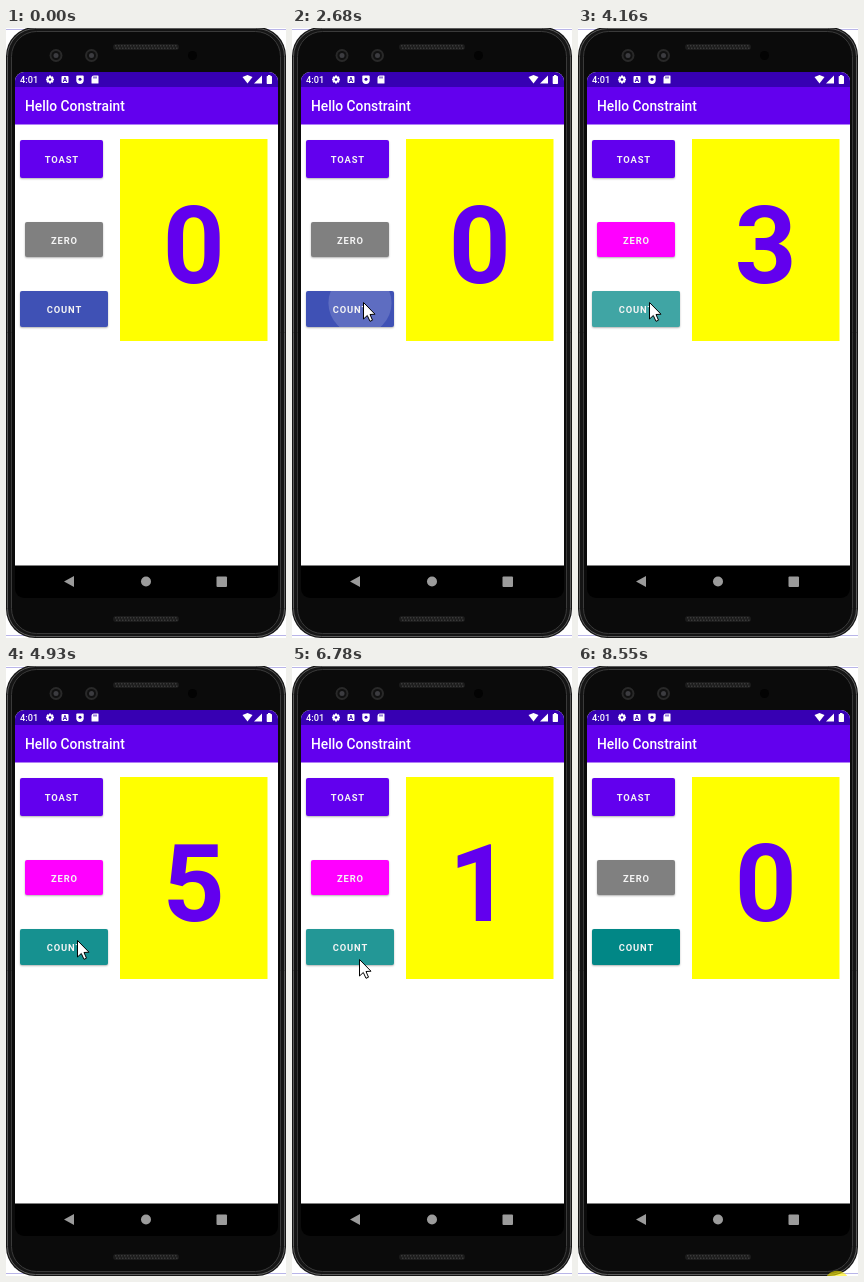
An HTML page with a canvas that plays this animation: 280x610 px, repeating every 8.78 s.

```html
<!DOCTYPE html>
<html lang="en">
<head>
<meta charset="utf-8">
<title>Hello Constraint</title>
<style>
html, body { margin: 0; width: 100%; height: 100%; overflow: hidden; background: #fff; }
canvas { display: block; width: 280px; height: 610px; }
</style>
</head>
<body>
<canvas id="stage" width="280" height="610"></canvas>
<script>
const ctx = document.getElementById('stage').getContext('2d');
const LOOP = 8780;
const ENTER = 360;
const HALO = 90, PRESS = 150, HOLD = 80, FADE = 150;

const buttons = {
  toast: { label: 'TOAST', x: 14, y: 112, w: 83, h: 38 },
  zero: { label: 'ZERO', x: 19, y: 194, w: 78, h: 35 },
  count: { label: 'COUNT', x: 14, y: 263, w: 88, h: 36 }
};

// The app answers the first click late
const click = (at, on, lag = 0) => ({ at, on, start: at + lag, hit: at + lag + PRESS });
const clicks = [
  click(2210, 'count', 470),
  ...[3385, 3930, 4240, 4600].map(at => click(at, 'count')),
  click(5470, 'zero'),
  click(6480, 'count'),
  click(7400, 'zero'),
  click(8550)
];

const home = { x: 235, y: 604 };
const moves = [
  { from: ENTER, to: 1210, x: 75, y: 228 },
  { from: 1590, to: 1980, x: 71, y: 274 },
  { from: 4930, to: 5320, x: 67, y: 221 },
  { from: 6003, to: 6310, x: 67, y: 293 },
  { from: 6870, to: 7320, x: 67, y: 221 },
  { from: 7630, to: 8250, x: 259, y: 617 }
];

const clamp = v => Math.min(1, Math.max(0, v));
const ease = v => v * v * (3 - 2 * v);

function pointerAt(t) {
  let { x, y } = home;
  for (const m of moves) {
    const k = ease(clamp((t - m.from) / (m.to - m.from)));
    x += (m.x - x) * k;
    y += (m.y - y) * k;
  }
  return { x, y };
}

function stateAt(t) {
  let count = 0, odd = false;
  for (const c of clicks.filter(c => c.on && c.hit <= t)) {
    if (c.on === 'zero') count = 0;
    else odd = ++count % 2 === 1;
  }
  return { count, odd };
}

function rect(x, y, w, h, color) {
  ctx.fillStyle = color;
  ctx.fillRect(x, y, w, h);
}

function round(x, y, w, h, r, fill, line) {
  ctx.beginPath();
  ctx.roundRect(x, y, w, h, r);
  if (fill) { ctx.fillStyle = fill; ctx.fill(); }
  if (line) { ctx.strokeStyle = line; ctx.stroke(); }
}

function clipRound(x, y, w, h, r) {
  ctx.beginPath();
  ctx.roundRect(x, y, w, h, r);
  ctx.clip();
}

function disc(x, y, r, color) {
  ctx.fillStyle = color;
  ctx.beginPath();
  ctx.arc(x, y, r, 0, Math.PI * 2);
  ctx.fill();
}

function poly(points, fill, line) {
  ctx.beginPath();
  points.forEach(([x, y]) => ctx.lineTo(x, y));
  ctx.closePath();
  ctx.fillStyle = fill;
  ctx.fill();
  if (line) { ctx.strokeStyle = line; ctx.stroke(); }
}

function text(s, x, y, size, weight, color, align = 'left', spacing = 0) {
  ctx.font = `${weight} ${size}px Roboto, sans-serif`;
  ctx.letterSpacing = spacing + 'px';
  ctx.textAlign = align;
  ctx.fillStyle = color;
  ctx.fillText(s, x + (align === 'center' ? spacing / 2 : 0), y);
}

function grille(y) {
  round(107, y, 66, 6, 3, '#1b1b1b');
  for (let x = 109; x < 172; x += 3) {
    rect(x, y + 1, 1.5, 1.5, '#3a3a3a');
    rect(x + 1, y + 3.5, 1.5, 1.5, '#3a3a3a');
  }
}

function lens(x) {
  disc(x, 27.5, 6.5, '#292929');
  disc(x, 27.5, 4.5, '#111');
  disc(x, 27.5, 2.5, '#3c3c40');
}

function phone() {
  rect(0, 0, 280, 610, '#fff');
  rect(0, 1, 280, 1, '#b9b5e8');
  rect(0, 607, 280, 1, '#b9b5e8');
  round(0, -1, 280, 611, 29, '#151515');
  round(1.5, 0.5, 277, 608, 28, null, '#5c5c5c');
  round(5.5, 3.5, 269, 602, 25, '#0b0b0b', '#3a3a3a');
  grille(16);
  grille(588);
  lens(50);
  lens(85.5);
  disc(186.5, 27.5, 4.5, '#030303');
}

function gear(x, y) {
  for (let i = 0; i < 4; i++) {
    ctx.save();
    ctx.translate(x, y);
    ctx.rotate(i * Math.PI / 4);
    rect(-4, -1, 8, 2, '#fff');
    ctx.restore();
  }
  disc(x, y, 3, '#fff');
  disc(x, y, 1.3, '#3700b3');
}

function statusBar() {
  rect(9, 44, 263, 15, '#3700b3');
  text('4:01', 14, 55, 9.2, 500, '#fff');
  gear(44, 51.5);
  round(55.5, 48, 7, 7, 1, '#fff');
  text('A', 59, 54, 6.5, 700, '#3700b3', 'center');
  round(70.3, 47.5, 7.4, 8.5, [1, 1, 4, 4], '#fff');
  disc(74, 51.3, 1.5, '#3700b3');
  round(85.5, 47.5, 7, 8, [2.5, 0.5, 0.5, 0.5], '#fff');
  rect(87.5, 48.5, 1, 2, '#3700b3');
  rect(89.5, 48.5, 1, 2, '#3700b3');
  poly([[236.5, 49], [241.5, 47], [246.5, 49], [241.5, 55.5]], '#fff');
  poly([[256, 47.5], [256, 55.5], [248, 55.5]], '#fff');
  round(260.7, 48, 5.3, 8, 0.7, '#fff');
  rect(262, 47, 2.5, 1, '#fff');
}

function navBar() {
  rect(9, 537.5, 263, 33, '#000');
  poly([[58, 553.5], [68, 548], [68, 559]], '#9b9b9b');
  disc(140, 553.5, 5, '#9b9b9b');
  round(210.5, 548.5, 10.5, 10.5, 1, '#9b9b9b');
}

function ripple(c, t) {
  const age = t - c.start;
  const fade = clamp((t - c.hit - HOLD) / FADE);
  if (age < 0 || fade >= 1) return;
  const alpha = (0.16 + 0.09 * clamp(age / PRESS)) * (1 - fade);
  const { x, y } = pointerAt(c.start);
  disc(x - 3, y + 1, 31 + 0.6 * age, `rgba(255,255,255,${alpha})`);
}

function button(name, color, t) {
  const { label, x, y, w, h } = buttons[name];
  ctx.save();
  ctx.shadowColor = 'rgba(0,0,0,.3)';
  ctx.shadowBlur = 2;
  ctx.shadowOffsetY = 1;
  round(x, y, w, h, 2, color);
  ctx.restore();

  ctx.save();
  clipRound(x, y, w, h, 2);
  clicks.filter(c => c.on === name).forEach(c => ripple(c, t));
  ctx.restore();
  text(label, x + w / 2, y + h / 2 + 4, 9.4, 700, '#f4f4f4', 'center', 0.84);
}

function pointer({ x, y }) {
  ctx.save();
  ctx.translate(x + 0.5, y + 0.5);
  poly([[0, 0], [0, 16.5], [3.8, 13], [6.5, 18.8], [9, 17.7], [6.5, 12], [11.5, 11.7]],
    '#fff', '#000');
  ctx.restore();
}

function screen(t) {
  const { count, odd } = stateAt(t);
  ctx.save();
  clipRound(9, 44, 263, 526, 9);
  rect(9, 44, 263, 494, '#fff');
  rect(9, 59, 263, 37.5, '#6200ee');
  statusBar();
  text('Hello Constraint', 19, 83.3, 13.8, 500, '#fff');
  navBar();
  rect(114, 111, 147.5, 202, '#ff0');
  text(String(count), 187.8, 254.5, 108, 700, '#6200ee', 'center');
  button('toast', '#6200ee', t);
  button('zero', count ? '#f0f' : '#808080', t);
  button('count', odd ? '#018786' : '#3f51b5', t);
  ctx.restore();
}

function draw(t) {
  phone();
  screen(t);
  const tip = pointerAt(t);
  const clicked = clicks.some(c => t >= c.at && (t < c.at + HALO || !c.on));
  if (clicked) disc(tip.x, tip.y, 12.3, 'rgba(255,240,0,.6)');
  if (t >= ENTER) pointer(tip);
}

const origin = performance.now();
function frame() {
  draw(Math.max(0, performance.now() - origin) % LOOP);
  requestAnimationFrame(frame);
}
frame();
</script>
</body>
</html>
```
